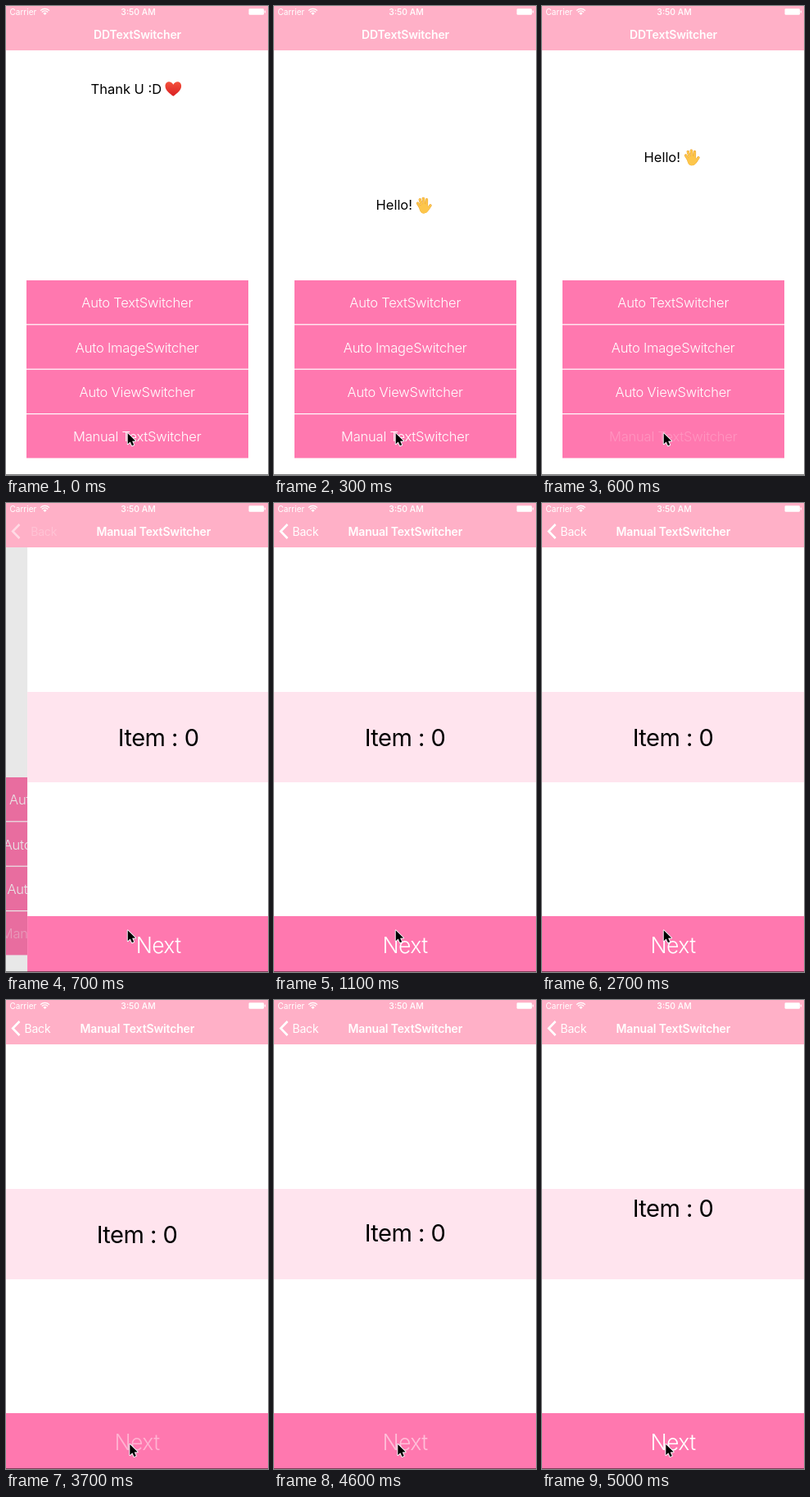
Recreate the animation shown at these times as an HTML page with a canvas. Size 320 by 571 pixels, loop 5.1 s.

```html
<!DOCTYPE html>
<html lang="en">
<head>
<meta charset="utf-8">
<title>DDTextSwitcher</title>
<style>
html, body { margin: 0; width: 100%; height: 100%; overflow: hidden; background: #fff; }
canvas { display: block; width: 320px; height: 571px; }
</style>
</head>
<body>
<canvas id="stage"></canvas>
<script>
const W = 320, H = 571, LOOP = 5100, STEP = 100;
const PINK = '#ff78af', NAV = '#ffb0c7', BAND = '#ffe4ee';
const SLIDE = 1500;      // one switcher transition
const PUSH_SHOWN = 700;  // first picture with the second screen

const canvas = document.getElementById('stage');
const dpr = window.devicePixelRatio || 1;
canvas.width = Math.round(W * dpr);
canvas.height = Math.round(H * dpr);
const ctx = canvas.getContext('2d');

const clamp = v => Math.max(0, Math.min(1, v));

// cubic-bezier(.42, 0, .58, 1)
function easeInOut(x) {
  if (x <= 0) return 0;
  if (x >= 1) return 1;
  let lo = 0, hi = 1;
  for (let i = 0; i < 24; i++) {
    const s = (lo + hi) / 2, r = 1 - s;
    if (3 * r * r * s * 0.42 + 3 * r * s * s * 0.58 + s * s * s < x) lo = s;
    else hi = s;
  }
  return 3 * (1 - lo) * lo * lo + lo * lo * lo;
}

// Critically damped spring
function spring(ms) {
  const k = 18.26 * Math.max(0, ms) / 1000;
  return 1 - (1 + k) * Math.exp(-k);
}

// Button label opacity: instant dim on press, slow return after release
function labelAlpha(t, down, up) {
  if (t < down) return 1;
  return 0.2 + 0.8 * clamp((t - up) / 500);
}

function rect(x, y, w, h, color) {
  ctx.fillStyle = color;
  ctx.fillRect(x, y, w, h);
}

// y is the middle of the capitals
function text(str, x, y, size, { weight = 400, color = '#fff', align = 'center', spacing = 0, alpha = 1 } = {}) {
  ctx.save();
  ctx.globalAlpha *= alpha;
  ctx.font = `${weight} ${size}px Inter, Roboto, sans-serif`;
  ctx.letterSpacing = spacing + 'px';
  ctx.textAlign = align;
  ctx.fillStyle = color;
  ctx.fillText(str, x, y + size * 0.364);
  ctx.restore();
}

function line(points, width, color) {
  ctx.beginPath();
  points.forEach(([x, y]) => ctx.lineTo(x, y));
  ctx.lineWidth = width;
  ctx.strokeStyle = color;
  ctx.stroke();
}

function heart(x, y) {
  ctx.save();
  ctx.translate(x, y);
  const g = ctx.createLinearGradient(0, -9, 0, 9);
  g.addColorStop(0, '#f5533d');
  g.addColorStop(1, '#d91f22');
  ctx.fillStyle = g;
  ctx.beginPath();
  ctx.moveTo(0, 9);
  ctx.bezierCurveTo(-4, 6, -9.8, 2, -9.8, -3.3);
  ctx.bezierCurveTo(-9.8, -9.8, -2.2, -10.4, 0, -5);
  ctx.bezierCurveTo(2.2, -10.4, 9.8, -9.8, 9.8, -3.3);
  ctx.bezierCurveTo(9.8, 2, 4, 6, 0, 9);
  ctx.fill();
  ctx.restore();
}

function hand(x, y) {
  const skin = '#fdc64b', edge = '#e69a2c';
  const fingers = [
    [[-5, 2], [-7.4, -3.4]],
    [[-2.5, 0], [-4.2, -7.4]],
    [[0.4, 0], [0, -8.4]],
    [[3, 1], [4, -6.6]],
    [[3.4, 6], [7.6, 1.2]]
  ];
  ctx.save();
  ctx.translate(x, y);
  ctx.rotate(-0.12);
  ctx.lineCap = 'round';
  for (const [width, color] of [[3.3, edge], [2.5, skin]]) {
    fingers.forEach(f => line(f, width, color));
    ctx.beginPath();
    ctx.ellipse(-0.6, 4, 5.6 - (3.3 - width) * 0, 5.7, 0, 0, Math.PI * 2);
    ctx.fillStyle = color;
    ctx.fill();
  }
  ctx.restore();
}

function cursor(x, y) {
  const shape = [[0, 0], [0, 13], [3, 10.3], [5.2, 15], [7.5, 14], [5.4, 9.5], [9.4, 9.3]];
  ctx.save();
  ctx.translate(x, y);
  ctx.beginPath();
  shape.forEach(([px, py]) => ctx.lineTo(px, py));
  ctx.closePath();
  ctx.lineJoin = 'round';
  ctx.lineWidth = 1.8;
  ctx.strokeStyle = '#fff';
  ctx.stroke();
  ctx.fillStyle = '#000';
  ctx.fill();
  ctx.restore();
}

function statusBar() {
  text('Carrier', 4.5, 7.2, 10, { align: 'left' });
  text('3:50 AM', 161.5, 7.2, 10.4, { weight: 500 });

  ctx.lineCap = 'butt';
  ctx.strokeStyle = ctx.fillStyle = '#fff';
  ctx.lineWidth = 1.4;
  for (const r of [7.6, 5.1]) {
    ctx.beginPath();
    ctx.arc(47.5, 11, r, -Math.PI * 0.75, -Math.PI * 0.25);
    ctx.stroke();
  }
  ctx.beginPath();
  ctx.moveTo(47.5, 11);
  ctx.arc(47.5, 11, 3, -Math.PI * 0.75, -Math.PI * 0.25);
  ctx.fill();

  ctx.beginPath();
  ctx.roundRect(296.5, 3.2, 18.5, 7.6, 1.4);
  ctx.fill();
  rect(315.6, 5.6, 1.3, 2.8, '#fff');
}

function navBar(p, t) {
  rect(0, 0, W, 54, NAV);
  statusBar();
  const title = { weight: 600, spacing: -0.15 };
  if (t < PUSH_SHOWN) {
    text('DDTextSwitcher', 160.5, 34.6, 14, title);
    return;
  }
  const shift = 1 - p;
  const shown = clamp((t - 630) / 300);
  text('Manual TextSwitcher', 160.3 + 245 * shift, 34.6, 14, title);
  text('Back', 22.5 + 95 * shift, 34.6, 14, { align: 'left', spacing: -0.2, alpha: shown });
  ctx.save();
  ctx.globalAlpha = clamp(shown + 0.3);
  ctx.lineCap = 'butt';
  ctx.lineJoin = 'miter';
  line([[16.5, 26], [8.2, 34.5], [16.5, 43]], 2.6, '#fff');
  ctx.restore();
}

function homeScreen(t) {
  rect(0, 0, W, H, '#fff');

  const mid = 160, top = 54, height = 2 * (mid - top);
  const p = easeInOut((t + 549) / SLIDE);
  const oldY = mid - p * height, newY = oldY + height;
  const label = { color: '#000', align: 'left' };
  ctx.save();
  ctx.beginPath();
  ctx.rect(0, top, W, height);
  ctx.clip();
  text('Thank U :D', 103.5, oldY, 16.5, label);
  heart(204.3, oldY);
  text('Hello!', 124.5, newY, 16.5, label);
  hand(183.3, newY + 0.5);
  ctx.restore();

  ['Auto TextSwitcher', 'Auto ImageSwitcher', 'Auto ViewSwitcher', 'Manual TextSwitcher'].forEach((name, i) => {
    const y = 334 + i * 54.4;
    const alpha = i === 3 ? labelAlpha(t, 500, 590) : 1;
    rect(25, y, 271, 53.2, PINK);
    text(name, 160.2, y + 27.2, 16.5, { weight: 300, spacing: -0.2, alpha });
  });
}

function manualScreen(t) {
  rect(0, 0, W, H, '#fff');
  rect(0, 230, W, 110, BAND);
  const rise = 110 * easeInOut((t - 4440) / SLIDE);
  ctx.save();
  ctx.beginPath();
  ctx.rect(0, 230, W, 110);
  ctx.clip();
  text('Item : 0', 160, 285.5 - rise, 29, { color: '#000', spacing: -0.5 });
  ctx.restore();

  rect(0, 503, W, 68, PINK);
  const alpha = t < 4400 ? labelAlpha(t, 3500, 3550) : labelAlpha(t, 4400, 4400);
  text('Next', 160, 538, 26.5, { weight: 300, spacing: -0.6, alpha });
}

function draw(t) {
  ctx.setTransform(dpr, 0, 0, dpr, 0, 0);
  const p = t < PUSH_SHOWN ? 0 : t >= 1100 ? 1 : spring(t - 473);

  if (p < 1) {
    ctx.save();
    ctx.translate(-96 * p, 0);
    homeScreen(t);
    ctx.restore();
  }
  if (p > 0) {
    rect(0, 0, W, H, `rgba(0,0,0,${0.1 * p})`);
    ctx.save();
    ctx.translate(W * (1 - p), 0);
    manualScreen(t);
    ctx.restore();
  }
  navBar(p, t);
  rect(0, 570, W, 1, 'rgba(0,0,0,0.5)');

  const m = easeInOut((t - 3100) / 500);
  cursor(148.7 + 2.6 * m, 520.3 + 20.7 * m);
}

const start = performance.now();
function tick() {
  const t = (performance.now() - start) % LOOP;
  draw(Math.floor(t / STEP) * STEP);
  requestAnimationFrame(tick);
}
tick();
</script>
</body>
</html>
```
